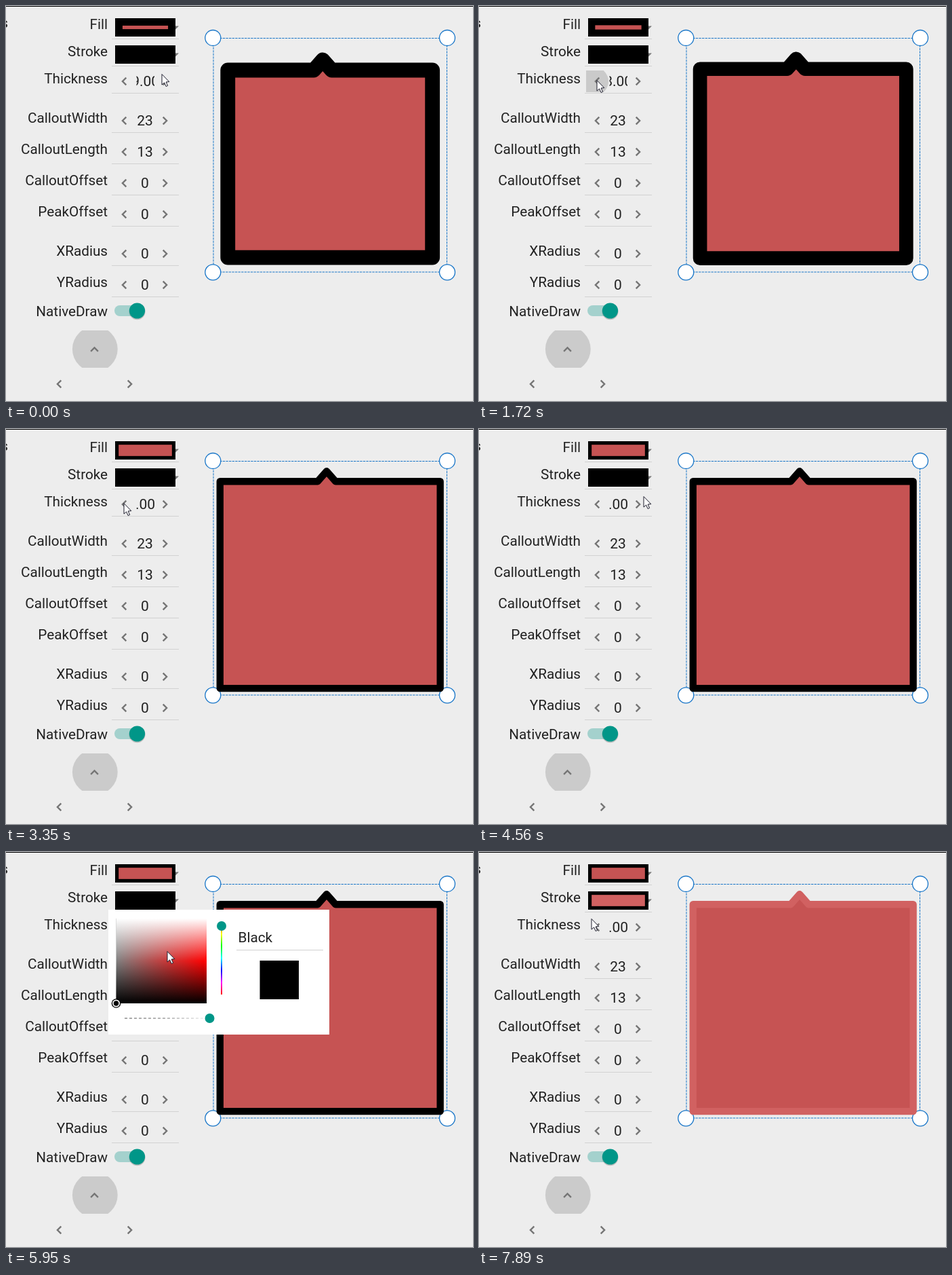
These frames come from a looping animation (689 by 582 pixels, 8 s). An HTML page with a canvas:

```html
<!DOCTYPE html>
<html lang="en">
<head>
<meta charset="utf-8">
<title>Callout stroke settings</title>
<style>
html, body { margin: 0; width: 100%; height: 100%; overflow: hidden; background: #ededed; }
canvas { display: block; }
</style>
</head>
<body>
<canvas id="stage" width="689" height="582"></canvas>
<script>
const ctx = document.getElementById('stage').getContext('2d');
const LOOP = 8000;
const UNIT = 1.15;
const FILL = '#c65353', PICKED = '#d16161', TEAL = '#009688', GREY = '#757575';
const POPUP_OPEN = 4990, PICK = 6230, POPUP_CLOSE = 7470;

const clamp = (v, lo, hi) => Math.max(lo, Math.min(hi, v));

// Pointer journeys: each runs from start to end and then rests
const journeys = [
  { start: 0, end: 370, x: 152, y: 110 },
  { start: 370, end: 630, x: 174, y: 109 },
  { start: 3750, end: 4250, x: 241, y: 70 },
  { start: 4430, end: 4560, x: 243, y: 99 },
  { start: 4560, end: 4850, x: 246, y: 72 },
  { start: 4850, end: 5130, x: 412, y: 210 },
  { start: 5400, end: 5950, x: 238, y: 146 },
  { start: 6370, end: 7070, x: 517, y: 32 },
  { start: 7340, end: 7750, x: 122, y: 105 },
  { start: 7750, end: 7890, x: 166, y: 98 }
];

function pointerAt(t) {
  let x = 230, y = 100;
  for (const j of journeys) {
    if (t < j.start) break;
    const steps = Math.round((j.end - j.start) / 130);
    const p = Math.floor(clamp((t - j.start) / (j.end - j.start), 0, 1) * steps) / steps;
    x += (j.x - x) * p;
    y += (j.y - y) * p;
  }
  return [x, y];
}

// Holding the left arrow counts down from 19 to 9 at a steady rate
const thicknessAt = t => 19 - clamp(Math.floor((t - 1432) / 184), 0, 10);

function box(x, y, w, h, color) {
  ctx.fillStyle = color;
  ctx.fillRect(x, y, w, h);
}

function disc(x, y, r, color) {
  ctx.beginPath();
  ctx.arc(x, y, r, 0, Math.PI * 2);
  ctx.fillStyle = color;
  ctx.fill();
}

function clipped(x, y, w, h, draw) {
  ctx.save();
  ctx.beginPath();
  ctx.rect(x, y, w, h);
  ctx.clip();
  draw();
  ctx.restore();
}

function text(str, x, y, align, size = 21) {
  ctx.font = `${size}px Roboto, sans-serif`;
  ctx.textAlign = align;
  ctx.fillStyle = '#212121';
  ctx.fillText(str, x, y);
}

function trace(points) {
  ctx.beginPath();
  for (const [x, y] of points) ctx.lineTo(x, y);
}

function chevron(x, y, angle) {
  ctx.save();
  ctx.translate(x, y);
  ctx.rotate(angle);
  trace([[-2.8, -5.4], [2.6, 0], [-2.8, 5.4]]);
  ctx.strokeStyle = GREY;
  ctx.lineWidth = 2.4;
  ctx.stroke();
  ctx.restore();
}

function label(str, base) {
  text(str, 150, base, 'right', 20.7);
}

function underlined(str, base) {
  label(str, base);
  box(156, base + 14, 99, 1, '#d2d2d2');
}

function stepper(name, base, value) {
  underlined(name, base);
  chevron(174.5, base - 3, Math.PI);
  chevron(234.5, base - 3, 0);
  text(value, 205, base + 4, 'center');
}

function swatch(y, color, inset) {
  trace([[243, y + 11.5], [255, y + 11.5], [249, y + 17.5]]);
  ctx.fillStyle = GREY;
  ctx.fill();
  box(161, y, 89, 27, '#000');
  box(161 + inset, y + inset, 89 - 2 * inset, 27 - 2 * inset, color);
}

function drawRipple(t) {
  if (t < 1060 || t >= 2250) return;
  const grow = Math.min(1, (t - 1060) / 530);
  const fade = t < 1860 ? 1 : (2250 - t) / 390;
  clipped(158, 95, 33, 32, () => disc(170, 111, 6 + 15 * grow, `rgba(0,0,0,${0.15 * fade})`));
}

function drawPanel(t, thick, stroke) {
  const inset = thick * UNIT / 2;
  text('s', 3.2, 32, 'right');
  drawRipple(t);

  underlined('Fill', 34);
  underlined('Stroke', 74);
  swatch(18, FILL, inset);
  swatch(58, stroke, inset);

  stepper('Thickness', 114, '');
  clipped(192.5, 98, 26.5, 26, () => text(thick.toFixed(2), 199.7, 118, 'center'));
  ['CalloutWidth', 'CalloutLength', 'CalloutOffset', 'PeakOffset']
    .forEach((name, i) => stepper(name, 172 + 46 * i, ['23', '13', '0', '0'][i]));
  ['XRadius', 'YRadius'].forEach((name, i) => stepper(name, 368 + 46 * i, '0'));

  label('NativeDraw', 457);
  ctx.beginPath();
  ctx.roundRect(160, 441, 42, 16, 8);
  ctx.fillStyle = '#a4d1cd';
  ctx.fill();
  disc(193.5, 450.3, 12, 'rgba(0,0,0,.2)');
  disc(193.5, 449, 11.6, TEAL);

  clipped(95, 478, 73, 55, () => disc(131.3, 505.5, 33.4, '#cbcbcb'));
  chevron(130.5, 506, -Math.PI / 2);
  chevron(78.5, 557, Math.PI);
  chevron(182.5, 557, 0);
}

function drawCallout(thick, stroke) {
  const w = thick * UNIT;
  const left = 305.4 + w, right = 651 - w;
  const top = 61.7 + 1.5 * w, bottom = 392.4 - w;
  const peak = 478.2 - w / 2, half = 23 * UNIT / 2;
  trace([[left, top], [peak - half, top], [peak, top - 13 * UNIT], [peak + half, top],
    [right, top], [right, bottom], [left, bottom]]);
  ctx.closePath();
  ctx.fillStyle = FILL;
  ctx.fill();
  ctx.strokeStyle = stroke;
  ctx.lineWidth = w;
  ctx.lineJoin = 'round';
  ctx.stroke();
  ctx.lineJoin = 'miter';
}

function drawSelection() {
  ctx.strokeStyle = '#1976c8';
  ctx.lineWidth = 1;
  ctx.setLineDash([3.4, 1.2]);
  ctx.strokeRect(306, 47.5, 344.5, 344.5);
  ctx.setLineDash([]);
  ctx.lineWidth = 1.3;
  for (const x of [305.3, 651]) {
    for (const y of [47, 392.3]) {
      disc(x, y, 11.5, '#fff');
      ctx.stroke();
    }
  }
}

function gradient(x0, y0, x1, y1, colors) {
  const g = ctx.createLinearGradient(x0, y0, x1, y1);
  colors.forEach((c, i) => g.addColorStop(i / (colors.length - 1), c));
  return g;
}

// Saturation runs across, lightness runs down
function drawPicker(x, y, w, h) {
  const mid = y + h / 2;
  box(x, y, w, h, gradient(x, 0, x + w, 0, ['#808080', '#f00']));
  box(x, y, w, h / 2, gradient(0, y, 0, mid, ['#fff', 'rgba(255,255,255,0)']));
  box(x, mid, w, h / 2, gradient(0, mid, 0, y + h, ['rgba(0,0,0,0)', '#000']));
}

function drawPopup(stroke) {
  const picked = stroke === PICKED;
  box(151, 85, 326, 184, '#fff');
  drawPicker(162.5, 98, 133.5, 125);
  box(317, 103, 2, 107, gradient(0, 103, 0, 210,
    ['#f00', '#ff0', '#0f0', '#0ff', '#00f', '#f0f', '#f00']));
  disc(318, 109, 7, TEAL);

  ctx.strokeStyle = gradient(172, 0, 294, 0, ['#8a8a8a', '#a0a0a0', '#f0f0f0']);
  ctx.lineWidth = 1.5;
  ctx.setLineDash([4, 3]);
  trace([[175, 245], [294, 245]]);
  ctx.stroke();
  ctx.setLineDash([]);
  disc(300.5, 245, 7, TEAL);

  const [mx, my] = picked ? [238, 147] : [162.5, 223];
  disc(mx, my, 6.8, '#000');
  disc(mx, my, 5.5, '#fff');
  disc(mx, my, 3.8, stroke);

  text(picked ? '#FFD16161' : 'Black', 342.5, 133, 'left', 20.7);
  box(340, 144, 128, 1, '#d0d0d0');
  box(374.5, 160, 57.5, 57, stroke);
}

function drawPointer(x, y) {
  ctx.save();
  ctx.translate(x, y + 0.5);
  trace([[0, 0], [0, 15.6], [3.6, 12.4], [6.1, 18], [8.6, 16.9], [6.1, 11.5], [10.8, 11.1]]);
  ctx.closePath();
  ctx.fillStyle = '#fff';
  ctx.fill();
  ctx.strokeStyle = '#1c1c2c';
  ctx.lineWidth = 1;
  ctx.stroke();
  ctx.restore();
}

function draw(t) {
  const thick = thicknessAt(t);
  const stroke = t < PICK ? '#000' : PICKED;
  box(0, 0, 689, 582, '#ededed');
  box(0, 0, 689, 1, '#000');
  drawPanel(t, thick, stroke);
  drawSelection();
  drawCallout(thick, stroke);
  if (t >= POPUP_OPEN && t < POPUP_CLOSE) drawPopup(stroke);
  drawPointer(...pointerAt(t));
}

const start = performance.now();
function tick() {
  draw((performance.now() - start) % LOOP);
  requestAnimationFrame(tick);
}
tick();
</script>
</body>
</html>
```
